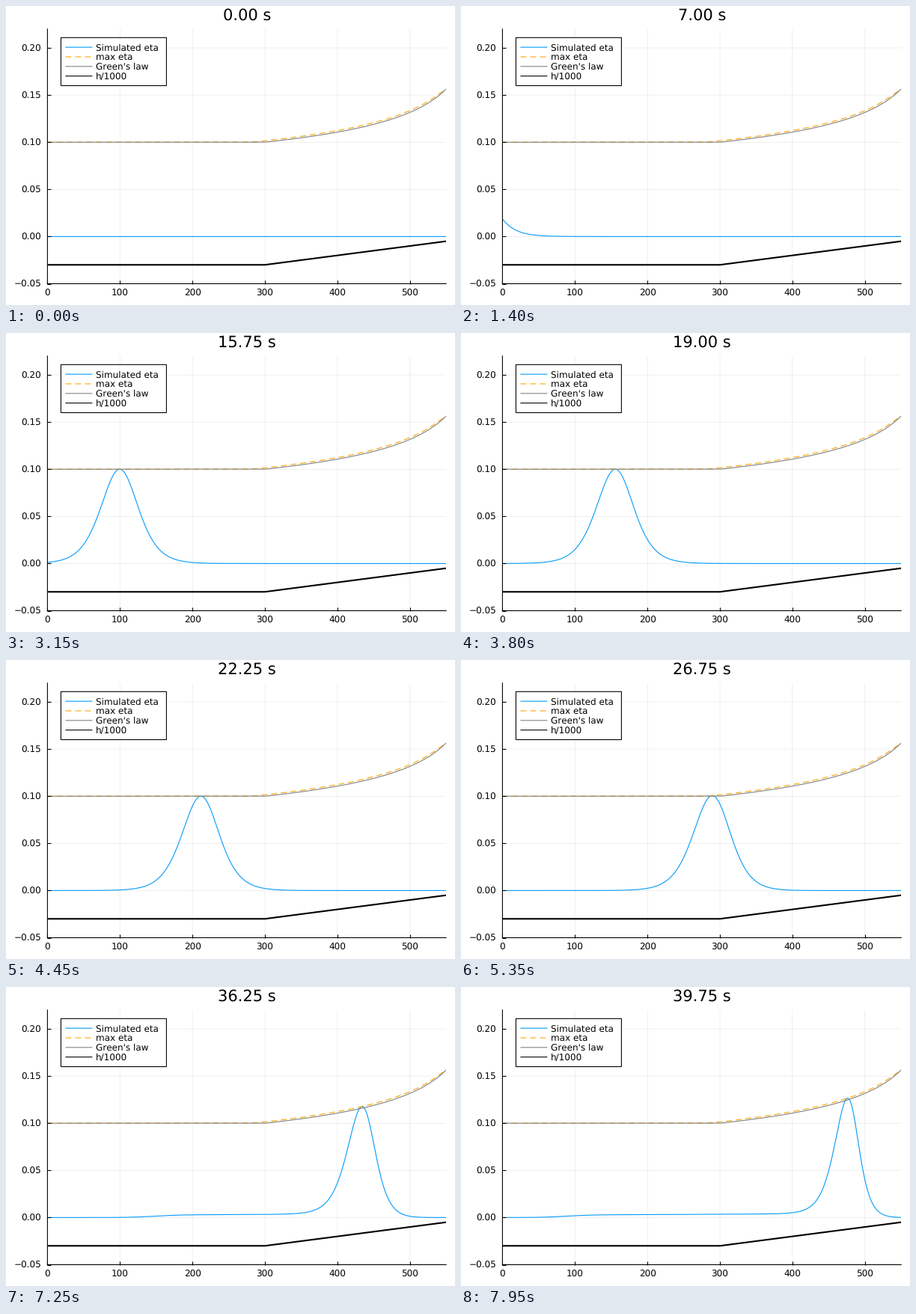
Write a matplotlib script that moves like this. It is 600x400 px and loops after 8000 ms.

```python
import numpy as np
import matplotlib.pyplot as plt
from matplotlib.animation import FuncAnimation
from matplotlib.patches import Rectangle

W, H, DPI = 600, 400, 100
PX = 72 / DPI                      # points per pixel
LEFT, RIGHT, TOP, BOTTOM = 55.4, 588.2, 30.8, 371.5
BLUE, ORANGE, GRAY = "#009afa", "#ffa500", "#808080"
FRAMES, STEP = 160, 0.25           # seconds of wave time per frame

plt.rcParams.update({
    "font.family": "DejaVu Sans",
    "text.hinting": "none",
    "text.hinting_factor": 1,
    "path.snap": False,
    "lines.dash_capstyle": "butt",
    "lines.solid_capstyle": "butt",
    "lines.scale_dashes": False,
})


def depth(x):
    return np.interp(x, [300, 550], [30, 5])


def simulate(duration=52.0, dt=0.025, g=9.81):
    """Shallow water on a staggered 1 m grid: pulse at x = 0, open right end."""
    x = np.arange(0, 551.0)
    h = depth(x)
    h_mid = (h[1:] + h[:-1]) / 2
    c_end = np.sqrt(g * h[-1])
    eta, u = np.zeros_like(x), np.zeros(len(x) - 1)
    crest = eta.copy()
    every = round(STEP / dt)
    shots = []
    for n in range(round(duration / dt)):
        eta[0] = 0.1 / np.cosh((n * dt - 9.97) / 2) ** 2
        crest = np.maximum(crest, eta)
        if n % every == 0 and len(shots) < FRAMES:
            shots.append(eta.copy())
        u_node = np.concatenate(([u[0]], (u[1:] + u[:-1]) / 2, [u[-1]]))
        u -= dt * np.diff(g * eta + u_node ** 2 / 2)
        flux = (h_mid + (eta[1:] + eta[:-1]) / 2) * u
        eta[1:-1] -= dt * np.diff(flux)
        eta[-1] -= 2 * dt * (c_end * eta[-1] - flux[-1])
    return x, shots, crest


x, waves, crest = simulate()

fig = plt.figure(figsize=(W / DPI, H / DPI), dpi=DPI, facecolor="white")
ax = fig.add_axes([LEFT / W, 1 - BOTTOM / H, (RIGHT - LEFT) / W, (BOTTOM - TOP) / H])
ax.set_xlim(0, 550)
ax.set_ylim(-0.05, 0.22)
x_ticks = np.arange(0, 501, 100)
y_ticks = np.arange(-1, 5) * 0.05
ax.set_xticks(x_ticks)
ax.set_yticks(y_ticks)
thin = 1.1 * PX
ax.tick_params(direction="in", length=5 * PX, width=thin,
               labelbottom=False, labelleft=False)
ax.set_axisbelow(False)
for side in ("top", "right"):
    ax.spines[side].set_visible(False)
for side in ("left", "bottom"):
    ax.spines[side].set_linewidth(thin)

grid = dict(color="black", alpha=0.1, lw=0.6 * PX, zorder=0.5)
for v in x_ticks[1:]:
    ax.axvline(v, **grid)
for v in y_ticks[1:]:
    ax.axhline(v, **grid)


def label(px, py, s, size=11.8, ha="left"):
    return fig.text(px / W, 1 - py / H, s, fontsize=size * PX,
                    ha=ha, va="baseline", zorder=12)


for v in x_ticks:
    label(LEFT + v / 550 * (RIGHT - LEFT), 387.8, f"{v}", ha="center")
for v in y_ticks:
    py = BOTTOM - (v + 0.05) / 0.27 * (BOTTOM - TOP)
    label(47.3, py + 4.3, f"{v:.2f}".replace("-", "\u2212"), ha="right")
clock = label((LEFT + RIGHT) / 2, 18.3, "0.00 s", 20.7, "center")

dash = (0, (8 * PX, 5 * PX))
wave, = ax.plot(x, waves[0], color=BLUE, lw=thin, zorder=2)
ax.plot(x, crest, color=ORANGE, lw=thin, ls=dash, zorder=2.1)
ax.plot(x, 0.1 * (30 / depth(x)) ** 0.25, color=GRAY, lw=thin, zorder=2.2)
ax.plot(x, -depth(x) / 1000, color="black", lw=2.1 * PX, zorder=2.3)

# Legend laid out in pixels
key = fig.add_axes([0, 0, 1, 1], zorder=5)
key.set_xlim(0, W)
key.set_ylim(H, 0)
key.axis("off")
key_top, row = 42.3, 12.85
key.add_patch(Rectangle((73.4, key_top), 141, 5 * row, fc="white", ec="black", lw=thin))
entries = [("Simulated eta", BLUE, "-"), ("max eta", ORANGE, dash),
           ("Green's law", GRAY, "-"), ("h/1000", "black", "-")]
for i, (name, color, ls) in enumerate(entries):
    y = key_top + row * (i + 1)
    key.plot([79.4, 115.4], [y, y], color=color, lw=thin, ls=ls)
    label(120.4, y + 4.2, name)


def update(i):
    wave.set_ydata(waves[i])
    clock.set_text(f"{i * STEP:.2f} s")
    return wave, clock


anim = FuncAnimation(fig, update, frames=FRAMES, interval=50,
                     repeat=True, repeat_delay=0, blit=False)
plt.show()
```
